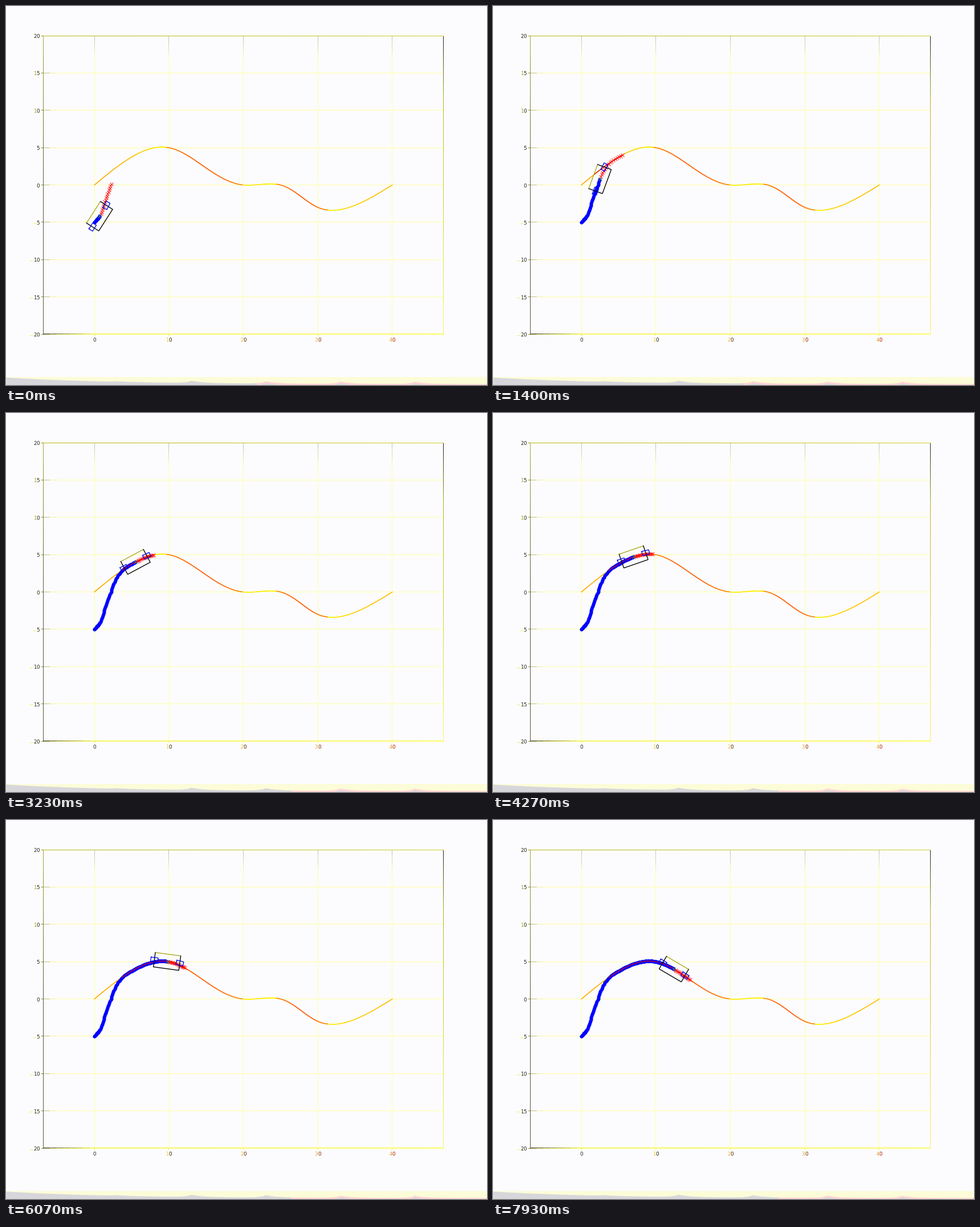
Write a matplotlib script that moves like this. It is 844 px wide and 664 px high and loops after 8 s.

```python
import numpy as np
import matplotlib.pyplot as plt
from matplotlib.animation import FuncAnimation
from matplotlib.collections import LineCollection
from matplotlib.colors import LinearSegmentedColormap

W, H, DPI = 844, 664, 100
PT = 72 / DPI                     # points per pixel
LOOP, STEP = 8000, 50
UNIT, X0, Y0 = 13.07, 155.1, 313.6
LEFT, RIGHT, TOP, BOTTOM = 65.5, 767.5, 52.5, 574.5
PALE, YELLOW, DARK = "#ffffa6", "#eeee22", "#222210"
GRAY, PINK = "#d7d7db", "#ffd4d6"

plt.rcParams["font.family"] = "DejaVu Sans"
fig = plt.figure(figsize=(W / DPI, H / DPI), dpi=DPI, facecolor="#fcfcfe")
ax = fig.add_axes([0, 0, 1, 1])
ax.set_xlim(0, W)
ax.set_ylim(H, 0)
ax.axis("off")


def natural(s, y, q):
    """Natural cubic spline through (s, y), evaluated at q."""
    n, h = len(s), np.diff(s)
    a, b = np.eye(n), np.zeros(n)
    for i in range(1, n - 1):
        a[i, i - 1:i + 2] = h[i - 1], 2 * (h[i - 1] + h[i]), h[i]
        b[i] = 6 * ((y[i + 1] - y[i]) / h[i] - (y[i] - y[i - 1]) / h[i - 1])
    m = np.linalg.solve(a, b)
    k = np.clip(np.searchsorted(s, q) - 1, 0, n - 2)
    u = (q - s[k]) / h[k]
    v = 1 - u
    bend = ((v**3 - v) * m[k] + (u**3 - u) * m[k + 1]) * h[k]**2 / 6
    return v * y[k] + u * y[k + 1] + bend


def lengths(x, y):
    return np.r_[0, np.cumsum(np.hypot(np.diff(x), np.diff(y)))]


def curve(points, count):
    x, y = np.array(points, float).T
    s = lengths(x, y)
    q = np.linspace(0, s[-1], count)
    return natural(s, x, q), natural(s, y, q)


def px(x):
    return X0 + UNIT * x


def py(y):
    return Y0 - UNIT * y


def snap(v):
    return np.floor(v) + 0.5


def shaded(x, y, colors, width, z):
    pts = np.c_[x, y]
    lines = LineCollection(np.stack([pts[:-1], pts[1:]], 1), colors=colors,
                           linewidths=width * PT, zorder=z, capstyle="projecting")
    lines.set_snap(False)
    ax.add_collection(lines)


def fade(x0, y0, x1, y1, stops, z=1):
    n = 60
    cmap = LinearSegmentedColormap.from_list("fade", stops)
    shaded(np.linspace(x0, x1, n + 1), np.linspace(y0, y1, n + 1),
           cmap(np.linspace(0, 1, n)), 1, z)


def label(text, right, y, first, rest):
    """Write a number right to left; its first sign has its own colour."""
    for i in reversed(range(len(text))):
        ax.text(right, y, text[i], color=rest if i else first,
                fontsize=8.8 * PT, ha="right", va="center_baseline")
        right -= 8.8 * 0.636


# grid, frame and numbers
for v in range(0, 41, 10):
    x, text = snap(px(v)), str(v)
    fade(x, TOP, x, BOTTOM, [(0, "#c4c4b8"), (0.07, PALE), (1, PALE)])
    fade(x, BOTTOM, x, BOTTOM + 3, [YELLOW if v else DARK, YELLOW])
    first = (0.9, 0.85 - v / 160, 0.1) if v else DARK
    label(text, px(v) + 2.8 * len(text), 584.8, first, (v / 60, 0.1, 0))
for v in range(-20, 21, 5):
    y = snap(py(v))
    fade(LEFT, y, RIGHT, y, [(0, "#c0c08c"), (0.02, PALE), (1, PALE)])
    fade(LEFT - 3, y, LEFT, y, ["#88882a", "#88882a"])
    first = YELLOW if v < 0 else "#a0a010" if v in (10, 15) else DARK
    label(str(v).replace("-", "−"), 59, py(v) + 0.4, first, DARK)

fade(LEFT, TOP, LEFT, BOTTOM, ["#a8a830", "#55553a", "#55553a"], 3)
fade(RIGHT, TOP, RIGHT, BOTTOM, [(0, "#222222"), (0.2, "#b4b420"), (1, "#f4f460")], 3)
fade(LEFT, TOP, RIGHT, TOP, ["#b8b818", "#cccc30"], 3)
fade(LEFT, BOTTOM, RIGHT, BOTTOM, [(0, "#333310"), (0.12, "#eeee20"), (1, "#f8f830")], 3)

# strip along the bottom edge: a falling ridge with regular bumps
rx = np.arange(W + 1)
ridge = 662 - 11.5 * np.exp(-rx / 190)
for v in range(3, 44, 10):
    d = rx - px(v)
    ridge -= (1 + 3 * (v > 3)) * np.exp(-np.abs(d) / np.where(d < 0, 9, 18))


def under(x0, x1, color, drop=0, z=2):
    return ax.fill_between(rx, np.minimum(ridge + drop, H), H, color=color, lw=0,
                           where=(rx >= x0) & (rx <= x1), zorder=z)


ax.fill_between([0, W], 650, H, color="#fcfcd8", lw=0)
under(0, 440, GRAY)
under(440, W, PINK)
for v in (23, 33, 43):
    under(px(v) - 8, px(v) + 20, GRAY, 3, 3)
late_ridge = under(440, 500, GRAY, 0, 4)

# course: orange uphill, red downhill, yellow where flat
cx, cy = curve([(0, 0), (10, 5), (20, 0), (25, 0), (30, -3), (40, 0)], 400)
slope = np.gradient(cy) / np.gradient(cx)
green = 0.95 - 0.33 * np.abs(slope) - 0.35 * (slope < -0.12)
cx, cy = px(cx), py(cy)
shaded(cx, cy, np.c_[np.ones(400), green, np.zeros(400)][:-1], 1.4, 4)

# driven path: swing up to the course, then stay on it
join = px(np.arange(4, 17))
path_x, path_y = curve([(155, 379), (165, 367), (172.5, 346), (184, 314), (196, 285.5),
                        *zip(join, np.interp(join, cx, cy))], 1500)
arc = lengths(path_x, path_y)
START = np.interp(164.2, path_x, arc)
FAST, SLOW, BRAKE = 49.5, 20.3, 2.2


def at(s):
    return np.array([np.interp(s, arc, path_x), np.interp(s, arc, path_y)])


def travelled(t):
    return START + FAST * np.minimum(t, BRAKE) + SLOW * np.maximum(t - BRAKE, 0)


def heading(s):
    dx, dy = at(s + 8) - at(s - 8)
    return np.arctan2(-dy, dx)


def axis(angle):
    return np.array([np.cos(angle), -np.sin(angle)])


dots = np.r_[np.linspace(0, START, 14), travelled(np.arange(0.06, 8, 0.06))]


def line(color, width, z, **kw):
    return ax.plot([], [], color=color, lw=width * PT, zorder=z, **kw)[0]


trail = line("#0000ff", 0, 5, marker="o", ms=5.3 * PT, mew=0.88 * PT)
retrace = line("#e00010", 1.2, 6)
horizon = line("#ff0000", 0, 7, marker="x", ms=5.3 * PT, mew=0.88 * PT)
goal = line("#3f7474", 0, 8, marker="x", ms=5.3 * PT, mew=1.2 * PT)
side = line("#a0a000", 1.2, 9, solid_capstyle="butt")
body = line("black", 1.35, 9, solid_joinstyle="miter")
wheels = [line("#0000e6", 1.3, 10, solid_joinstyle="miter") for _ in range(2)]


def corners(center, angle, length, width):
    """Rear left, rear right, front right, front left."""
    d = axis(angle) * length / 2
    n = axis(angle + np.pi / 2) * width / 2
    return np.array([center - d + n, center - d - n, center + d - n, center + d + n])


def draw(i):
    t = i * STEP / 1000
    s = travelled(t)
    pos, angle = at(s), heading(s)
    reach = np.interp(t, [1.4, 2.5], [60, 34])
    ahead = at(s + np.linspace(0.08, 1, 16) * reach)

    trail.set_data(*at(dots[dots <= s + 0.01]))
    horizon.set_data(*ahead)
    goal.set_data([pos[0]], [pos[1]])
    near = (cx > min(203, pos[0] - 10)) & (cx < ahead[0, -1]) & (pos[0] > 175)
    retrace.set_data(cx[near], cy[near])

    box = corners(pos, angle, 45, 25.5)
    body.set_data(*box.T)
    side.set_data(*box[[0, 3]].T)
    axle = axis(angle) * 22.5
    steered = angle + 0.4 * (heading(s + 22.5) - angle)
    for wheel, c, a in zip(wheels, (pos - axle, pos + axle), (angle, steered)):
        ring = corners(c, a, 12.5, 7.6)
        wheel.set_data(*ring[[0, 1, 2, 3, 0]].T)
    late_ridge.set_visible(t >= 2.63)
    return trail, retrace, horizon, goal, side, body, *wheels, late_ridge


anim = FuncAnimation(fig, draw, frames=LOOP // STEP, interval=STEP,
                     init_func=lambda: draw(0), repeat=True, repeat_delay=0)
plt.show()
```
